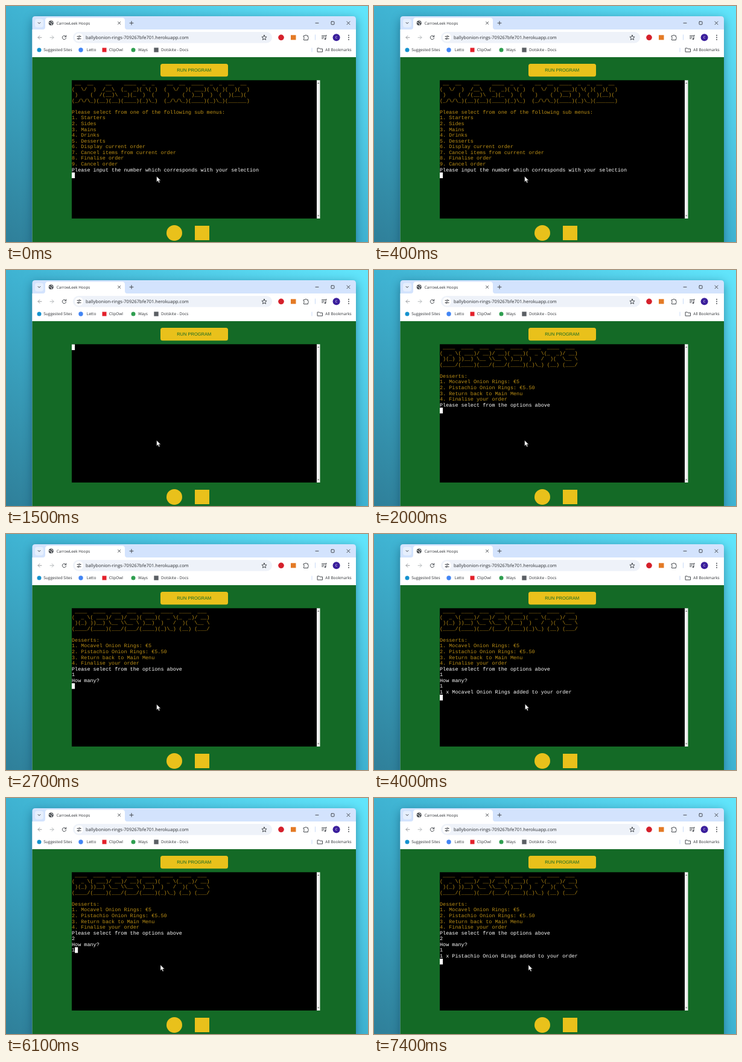
These frames come from a looping animation (600 px wide and 392 px high, 8 s). An HTML page:

```html
<!DOCTYPE html>
<html lang="en">
<head>
<meta charset="utf-8">
<title>Terminal order</title>
<style>
  html, body { margin: 0; width: 100%; height: 100%; overflow: hidden; background: #35b4cf; }
  svg { display: block; width: 600px; height: 392px; }
  text { text-rendering: geometricPrecision; }
  .ui { font-family: "Open Sans", "Noto Sans", sans-serif; font-size: 6.5px; fill: #2a2d31; }
  .term text { font-family: "Liberation Mono", monospace; font-size: 8.47px; white-space: pre; }
  .line { fill: none; stroke: #45494e; stroke-width: 1; stroke-linecap: round; stroke-linejoin: round; }
  .shadow { filter: drop-shadow(0 4px 8px rgba(0, 45, 75, .45)); }
</style>
</head>
<body>
<svg viewBox="0 0 600 392">
  <defs>
    <linearGradient id="desk" x1="1" y1="0" x2="0" y2="1">
      <stop offset="0" stop-color="#62e6fc"/>
      <stop offset=".5" stop-color="#3fb3d2"/>
      <stop offset="1" stop-color="#2f7f99"/>
    </linearGradient>
  </defs>
  <rect width="600" height="392" fill="url(#desk)"/>

  <!-- browser window -->
  <path class="shadow" d="M43.5 400V22q0-5 5-5H575q5 0 5 5V400z" fill="#d3e3fd"/>
  <rect x="48" y="21.5" width="14" height="14" rx="4" fill="#e6effd"/>
  <path class="line" d="M53 27.3l2 2 2-2"/>
  <path d="M61 39q4 0 4-4V24q0-4.5 4.5-4.5H192.5q4.5 0 4.5 4.5v11q0 4 4 4z" fill="#fff"/>
  <rect x="43.5" y="39" width="536.5" height="46" fill="#fff"/>
  <g>
    <circle cx="74.7" cy="28.3" r="4" fill="#4a4e53"/>
    <path d="M71.5 27.5q2-.4 2.5 1t2 1.2l-.6 2M75 25.2q0 1.6 1.5 1.6l1.5.7" fill="none" stroke="#fff" stroke-width=".9"/>
  </g>
  <path class="line" d="M185.6 26.3l4 4m0-4l-4 4M205 28.3h6m-3-3v6M513 28.3h5M565 25.8l5 5m0-5l-5 5"/>
  <rect class="line" x="539" y="25.8" width="5" height="5" rx=".8"/>

  <!-- toolbar -->
  <path class="line" d="M59 52.3h-6m2.8-2.8l-2.8 2.8 2.8 2.8" style="stroke:#9b9ea2"/>
  <path class="line" d="M73 52.3h6m-2.8-2.8l2.8 2.8-2.8 2.8" style="stroke:#b5b8bb"/>
  <path class="line" d="M99.4 51a3.2 3.2 0 1 0 .2 2.3M99.7 48.8v2.4h-2.4"/>
  <rect x="111" y="43" width="330" height="18.5" rx="9.25" fill="#eef2f9"/>
  <circle cx="121" cy="52.3" r="7" fill="#fff"/>
  <path class="line" d="M118 50.5h2.2M123 50.5h1.2M118 54.3h1M121.5 54.3h2.7"/>
  <circle class="line" cx="121.7" cy="50.5" r="1.2"/>
  <circle class="line" cx="120.2" cy="54.3" r="1.2"/>
  <path class="line" d="M428 48.3l1.2 2.7 2.9.3-2.2 2 .6 2.9-2.5-1.5-2.5 1.5.6-2.9-2.2-2 2.9-.3z"/>
  <circle cx="456" cy="52.3" r="4.8" fill="#d5202b"/>
  <rect x="472" y="48.3" width="8.5" height="8" fill="#e47a25"/>
  <path class="line" d="M493.5 49.5h2.3a1.3 1.3 0 0 1 2.6 0h2.1v2.3a1.3 1.3 0 0 1 0 2.5v2.2h-7v-2.2a1.3 1.3 0 0 0 0-2.5z"/>
  <path d="M512.5 47.5v9" stroke="#c9daf7"/>
  <path class="line" d="M523.5 49.5h5M523.5 51.8h4M523.5 54h2.5M530 49v5.5m0-5.5h1.5"/>
  <circle cx="529" cy="54.7" r="1.3" fill="#45494e"/>
  <circle cx="547.6" cy="52.3" r="6" fill="#3b1f9c"/>
  <g fill="#45494e"><circle cx="568" cy="48.8" r=".95"/><circle cx="568" cy="52.3" r=".95"/><circle cx="568" cy="55.8" r=".95"/></g>

  <!-- bookmarks -->
  <circle cx="55" cy="73" r="3.5" fill="#1592cf"/>
  <circle cx="124" cy="73" r="3.7" fill="#4285f4"/>
  <rect x="159.5" y="69.5" width="7" height="7" fill="#e3202a"/>
  <circle cx="211" cy="73" r="3.5" fill="#2f9e50"/>
  <rect x="245.3" y="69.3" width="7.4" height="7.4" fill="#5b5f64"/>
  <path d="M507 69.5v7" stroke="#c9daf7"/>
  <path class="line" d="M516.5 70h2.8l1 1.2h4.2v5h-8z"/>

  <g class="ui">
    <text x="83.8" y="30.8" style="font-size:6.3px">CarrowLeek Hoops</text>
    <text x="132" y="55" style="font-size:7.52px">ballybonion-rings-709267bfe701.herokuapp.com</text>
    <text x="547.6" y="54.4" text-anchor="middle" style="font-size:5.5px;fill:#fff">C</text>
    <text x="62.3" y="75.4">Suggested Sites</text>
    <text x="133.8" y="75.4">Letto</text>
    <text x="170.8" y="75.4">ClipOwl</text>
    <text x="219" y="75.4">Ways</text>
    <text x="257" y="75.4">Dotskite - Docs</text>
    <text x="529.3" y="75.4">All Bookmarks</text>
  </g>

  <!-- page -->
  <rect x="43.5" y="85" width="536.5" height="307" fill="#146a26"/>
  <rect x="256" y="96" width="112" height="21.3" rx="3.5" fill="#e9c11b"/>
  <text x="311.7" y="109.4" text-anchor="middle" fill="#146a26" font-family="Liberation Sans, sans-serif" font-size="7.5">RUN PROGRAM</text>
  <circle cx="279" cy="377" r="13" fill="#e9c11b"/>
  <rect x="313" y="365" width="24" height="24" fill="#e9c11b"/>
  <rect x="109" y="123.3" width="406" height="229.7" fill="#000"/>
  <rect x="515" y="123.3" width="5.5" height="229.7" fill="#f1f1f1"/>
  <path d="M516 129l1.7-2 1.7 2zM516 347.5l1.7 2 1.7-2z" fill="#777"/>

  <g class="term" id="rows"></g>
  <rect id="caret" width="5.08" height="9.56" fill="#fff"/>
  <path id="mouse" d="M0 0V9.3L2.1 7.3 3.6 10.8 5.2 10.1 3.7 6.7H6.6z" fill="#fff" stroke="#222" stroke-width=".5"/>
</svg>

<script>
const LOOP = 8000, LEFT = 109, TOP = 123.5, COL = 5.082, ROW = 9.56, BASELINE = 7.6;

const mainMenu = String.raw` __  __    __    ____  _  _    __  __  ____  _  _  __  __
(  \/  )  /__\  (_  _)( \( )  (  \/  )( ___)( \( )(  )(  )
 )    (  /(__)\  _)(_  )  (    )    (  )__)  )  (  )(__)(
(_/\/\_)(__)(__)(____)(_)\_)  (_/\/\_)(____)(_)\_)(______)

Please select from one of the following sub menus:
1. Starters
2. Sides
3. Mains
4. Drinks
5. Desserts
6. Display current order
7. Cancel items from current order
8. Finalise order
9. Cancel order`.split('\n');

const desserts = String.raw` ____  ____  ___  ___  ____  ____  ____  ___
(  _ \( ___)/ __)/ __)( ___)(  _ \(_  _)/ __)
 )(_) ))__) \__ \\__ \ )__)  )   /  )(  \__ \
(____/(____)(___/(___/(____)(_)\_) (__) (___/

Desserts:
1. Mocavel Onion Rings: €5
2. Pistachio Onion Rings: €5.50
3. Return back to Main Menu
4. Finalise your order`.split('\n');

const askMenu = 'Please input the number which corresponds with your selection';
const askItem = 'Please select from the options above';
const askCount = 'How many?';
const added = item => `1 x ${item} Onion Rings added to your order`;

// [start, yellow menu lines, ...white lines]; the caret follows the last line
const screens = [
  [0, mainMenu, askMenu, ''],
  [900, mainMenu, askMenu, '5'],
  [1500, [], ''],
  [1600, desserts, askItem, ''],
  [2100, desserts, askItem, '1'],
  [2700, desserts, askItem, '1', askCount, ''],
  [2800, desserts, askItem, '1', askCount, '1'],
  [3200, desserts, askItem, '1', askCount, '1', added('Mocavel'), ''],
  [5300, desserts, askItem, ''],
  [5500, desserts, askItem, '2'],
  [6000, desserts, askItem, '2', askCount, ''],
  [6100, desserts, askItem, '2', askCount, '1'],
  [7300, desserts, askItem, '2', askCount, '1', added('Pistachio'), '']
];
const pointer = [[0, 249.7, 283], [3000, 250.4, 282.6], [5300, 256, 277.3]];

const byId = id => document.getElementById(id);
const at = (steps, t) => steps.findLast(step => step[0] <= t);

const rows = Array.from({ length: 24 }, (_, i) => {
  const row = document.createElementNS('http://www.w3.org/2000/svg', 'text');
  row.setAttribute('x', LEFT);
  row.setAttribute('y', TOP + i * ROW + BASELINE);
  return byId('rows').appendChild(row);
});

let shown;
function show(screen) {
  if (screen === shown) return;
  shown = screen;
  const [, menu, ...white] = screen;
  const lines = [...menu, ...white];
  rows.forEach((row, i) => {
    row.textContent = lines[i] || '';
    row.setAttribute('fill', i < menu.length ? '#bd9016' : '#fff');
  });
  byId('caret').setAttribute('x', LEFT + lines.at(-1).length * COL);
  byId('caret').setAttribute('y', TOP + (lines.length - 1) * ROW);
}

function draw() {
  const t = performance.now() % LOOP;
  show(at(screens, t));
  const [, x, y] = at(pointer, t);
  byId('mouse').setAttribute('transform', `translate(${x} ${y})`);
  requestAnimationFrame(draw);
}
draw();
</script>
</body>
</html>
```
